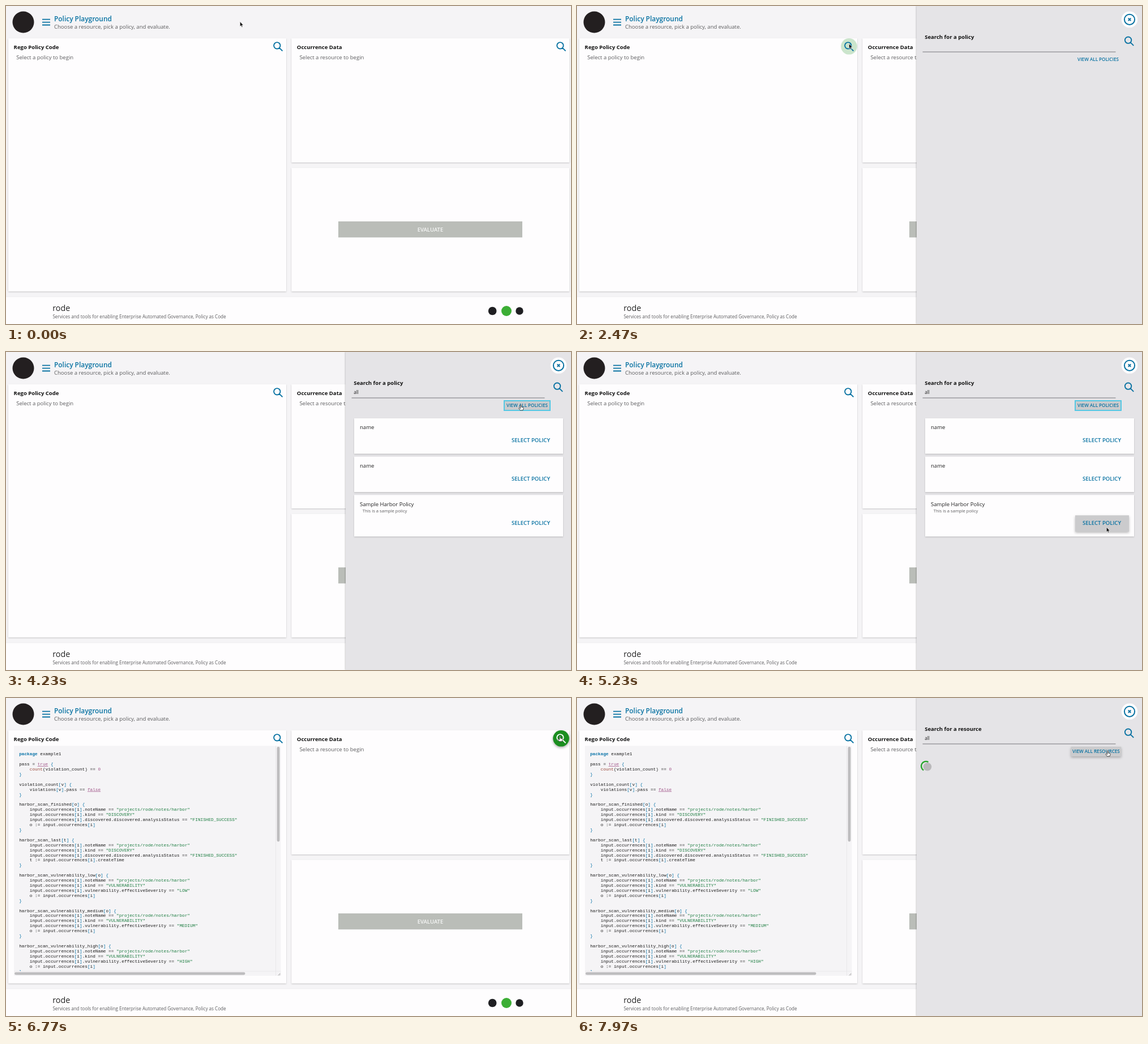
An HTML page that plays this animation: 998 by 561 pixels, repeating every 8000 ms.

```html
<!DOCTYPE html>
<html lang="en">
<head>
<meta charset="utf-8">
<title>Policy Playground</title>
<style>
  html, body { margin: 0; width: 100%; height: 100%; overflow: hidden; background: #f5f4f6; }
  svg { display: block; }
  text { font: 9.54px "Open Sans", sans-serif; fill: #222; white-space: pre; }
  .title { font-size: 11.92px; font-weight: 600; fill: #0872a2; }
  .bold { font-weight: 700; fill: #111; }
  .muted { fill: #5c5c5e; }
  .small { font-size: 8.1px; }
  .action { font-weight: 600; fill: #0872a2; }
  .card { fill: #fefdfe; filter: drop-shadow(0 1px 1px #0003); }
  .column { width: 491px; }
  .lift { fill: #cbcbcd; filter: drop-shadow(0 2px 2px #0004); }
  .thumb { fill: #bebdbf; }
  .blue { color: #0872a2; }

  .search circle { fill: none; }
  .search.hover { color: #fff; }
  .search.hover circle { fill: #1b8e20; filter: drop-shadow(0 2px 2px #0005); }
  .search.focus circle { fill: #cbe5cc; }

  .code text { font: 7.74px "Liberation Mono", monospace; fill: #1c1c1c; }
  .code .keyword, .code .punctuation { fill: #0873a8; }
  .code .keyword { font-weight: 700; }
  .code .boolean { fill: #a2588b; text-decoration: underline; }
  .code .number { fill: #a2588b; }
  .code .call { fill: #9c4a3c; }
  .code .string { fill: #1f7f43; }

  /* A page scrollbar narrows the layout for a moment. */
  .scrolled .column { width: 486.8px; }
  .scrolled .evaluate { width: 322.5px; }
  .scrolled .near { transform: translateX(-4.2px); }
  .scrolled .middle { transform: translateX(-5px); }
  .scrolled .center { transform: translateX(-6.7px); }
  .scrolled .far { transform: translateX(-8.4px); }
  .scrolled .wide { width: 400px; }
</style>
</head>
<body>
<svg id="stage" width="998" height="561" viewBox="0 0 998 561">
  <defs>
    <g id="lens" fill="none" stroke="currentColor" stroke-width="1.9">
      <path d="M5.7 0a5.7 5.7 0 1 1-11.4 0a5.7 5.7 0 1 1 11.4 0M4.1 4.1L9.6 9.6"/>
    </g>
    <path id="arrow" d="M0 0V8.6L2 6.9L3.3 9.9L4.7 9.3L3.4 6.4H6Z"
          fill="#111" stroke="#fff" stroke-width=".6"/>
    <path id="hand" d="M-.8 .6Q0-.6.8 .6V4L4 4.8Q4.8 5 4.6 6.3L3.6 9.8H-1.3L-3.6 6.4Q-3.6 5-2.2 5.6L-.8 6.8Z"
          fill="#fff" stroke="#222" stroke-width=".8"/>
  </defs>

  <rect width="998" height="561" fill="#f5f4f6"/>
  <circle cx="30.5" cy="28.5" r="19" fill="#231f20"/>
  <path d="M64 23.7h14M64 28.6h14M64 33.5h14" stroke="#0872a2" stroke-width="1.8"/>
  <text class="title" x="85" y="26.5">Policy Playground</text>
  <text class="muted" x="85" y="40.4">Choose a resource, pick a policy, and evaluate.</text>

  <rect class="card column" x="4" y="57" height="446.5"/>
  <text class="bold" x="13.6" y="76.4">Rego Policy Code</text>
  <text class="muted" id="policyHint" x="18.2" y="94.4">Select a policy to begin</text>
  <g class="near"><g class="search blue" id="policySearch">
    <circle cx="480.5" cy="71.3" r="14.3"/><use href="#lens" x="478.8" y="69.8"/>
  </g></g>

  <g class="code" id="code">
    <rect class="column" x="14" y="84.5" height="405.5" fill="#f5f4f6" style="width:auto" id="codeBox"/>
    <svg x="14" y="84.5" width="462" height="397.5" viewBox="14 84.5 462 397.5" id="lines"></svg>
    <path d="M14 482h462" stroke="#e4e3e5" stroke-width=".7"/>
    <g class="near">
      <path d="M476.5 84.5V490M476 482h9.5" stroke="#e4e3e5" stroke-width=".7"/>
      <rect class="thumb" x="478.6" y="86" width="4.8" height="167.5" rx="2.4"/>
      <path d="M480.5 489.5l4-4M482.7 489.5l2-2" stroke="#888" stroke-width=".7"/>
    </g>
    <rect class="thumb wide" x="15" y="483.7" width="407.5" height="4.8" rx="2.4"/>
  </g>

  <g class="near">
    <rect class="card column" x="504.2" y="57" height="219"/>
    <rect class="card column" x="504.2" y="285.5" height="218"/>
    <text class="bold" x="513.8" y="76.4">Occurrence Data</text>
    <text class="muted" x="518.4" y="94.4">Select a resource to begin</text>
  </g>
  <g class="far"><g class="search blue" id="resourceSearch">
    <circle cx="980.5" cy="71.3" r="14.3"/><use href="#lens" x="978.9" y="69.8"/>
  </g></g>
  <rect class="evaluate middle" x="587" y="380" width="325" height="28.3" fill="#babdb8"/>
  <text class="center" x="749.5" y="397.6" text-anchor="middle" style="fill:#f7f8f7;font-weight:600">EVALUATE</text>

  <rect y="513" width="998" height="48" fill="#fefdfe"/>
  <path d="M0 513h998" stroke="#ecebed" stroke-width=".8"/>
  <text x="82.3" y="538" style="font-size:14.3px">rode</text>
  <text class="small muted" x="82.4" y="551">Services and tools for enabling Enterprise Automated Governance, Policy as Code</text>
  <g class="far" fill="#1f1f22">
    <circle cx="859.2" cy="538" r="7.3"/>
    <circle cx="884" cy="538" r="9" fill="#3cae35"/>
    <circle cx="907" cy="538" r="6.7"/>
  </g>
  <g id="pageBar">
    <rect x="990.5" width="7.5" height="561" fill="#f9f8fa"/>
    <path d="M990.8 0V561" stroke="#e4e3e5" stroke-width=".7"/>
    <rect class="thumb" x="992.8" y="2" width="4.8" height="507" rx="2.4"/>
  </g>

  <g id="panel">
    <rect x="600" width="398" height="561" fill="#e5e4e7" style="filter:drop-shadow(-1px 0 1px #0003)"/>
    <circle cx="976" cy="23.8" r="14.3" fill="#fefdfe"/>
    <circle cx="976" cy="23.8" r="9.1" fill="none" stroke="#0872a2" stroke-width="2"/>
    <path d="M973.7 21.5l4.6 4.6M978.3 21.5l-4.6 4.6" stroke="#0872a2" stroke-width="2"/>
    <text class="bold" id="panelTitle" x="614.2" y="57.8"></text>
    <text class="small" id="query" x="614.2" y="73.6">all</text>
    <path d="M610.5 81h341" stroke="#77767a" stroke-width="1"/>
    <use class="blue" href="#lens" x="973.6" y="60.2"/>
    <rect id="viewAllBox" y="86" height="17"/>
    <text class="small action" id="viewAll" y="97.4" text-anchor="middle"></text>
    <g id="spinner">
      <circle cx="619" cy="121.3" r="7.3" fill="#bab9bb"/>
      <path id="spinnerArc" d="M612.2 127.4A8.1 8.1 0 0 1 620.5 113" fill="none" stroke="#25a52a" stroke-width="2.4"/>
    </g>
    <rect id="placeholder" x="948.7" y="532" width="21.5" height="18" fill="#d3d2d5"/>
    <g id="results"></g>
  </g>
  <use id="cursor" href="#arrow"/>
</svg>

<script>
const LOOP = 8000;
const $ = id => document.getElementById(id);
const show = (id, visible) => { $(id).style.display = visible ? "" : "none"; };

const scanRule = (name, arg, kind, fieldTest, result) => `${name}[${arg}] {
    input.occurrences[i].noteName == "projects/rode/notes/harbor"
    input.occurrences[i].kind == "${kind}"
    input.occurrences[i].${fieldTest}
    ${result}
}
`;
const finished = 'discovered.discovered.analysisStatus == "FINISHED_SUCCESS"';
const severityRule = level => scanRule(`harbor_scan_vulnerability_${level}`, "o", "VULNERABILITY",
  `vulnerability.effectiveSeverity == "${level.toUpperCase()}"`, "o := input.occurrences[i]");
const source = [
  "package example1\n",
  "pass = true {\n    count(violation_count) == 0\n}\n",
  "violation_count[v] {\n    violations[v].pass == false\n}\n",
  scanRule("harbor_scan_finished", "o", "DISCOVERY", finished, "o := input.occurrences[i]"),
  scanRule("harbor_scan_last", "t", "DISCOVERY", finished, "t := input.occurrences[i].createTime"),
  ...["low", "medium", "high"].map(severityRule)
].join("\n");

const tokens = /(?<string>"[^"]*")|(?<keyword>\bpackage\b)|(?<boolean>\b(?:true|false)\b)|(?<call>\bcount(?=\())|(?<number>\b0\b)|(?<punctuation>[[\]{}])/g;
const highlight = line => line.replace(tokens, (token, ...rest) => {
  const [kind] = Object.entries(rest.at(-1)).find(([, match]) => match);
  return `<tspan class="${kind}">${token}</tspan>`;
});
$("lines").innerHTML = source.split("\n")
  .map((line, i) => `<text x="23.2" y="${101.2 + i * 8.915}">${highlight(line)}</text>`).join("");

const resultCard = (y, height, name, note = "") => `
  <rect class="card" x="615" y="${y}" width="369" height="${height}"/>
  <text x="625" y="${y + 19.3}">${name}</text>
  <text class="muted" x="629.8" y="${y + 31}" style="font-size:7.63px">${note}</text>
  ${note && `<rect class="lift" id="selectHover" x="880" y="${y + 36}" width="95" height="28.7"/>`}
  <text class="action" x="927" y="${y + height - 20.2}" text-anchor="middle">SELECT POLICY</text>`;
$("results").innerHTML = resultCard(117, 62.5, "name") + resultCard(184.6, 62.5, "name") +
  resultCard(252.2, 73.3, "Sample Harbor Policy", "This is a sample policy");

// Cursor stops: arrival time, departure time, x, y
const stops = [
  [0, 970, 413.3, 27.5],
  [2080, 2500, 480.5, 66.5],
  [3250, 4250, 909.5, 93],
  [5040, 5420, 935.3, 309],
  [6680, 7120, 978.5, 67],
  [7880, LOOP, 937.5, 93]
];
function cursorAt(t) {
  const next = stops.findIndex(([arrive]) => arrive > t);
  if (next < 0) return stops.at(-1).slice(2);
  const [, depart, x0, y0] = stops[next - 1];
  const [arrive, , x1, y1] = stops[next];
  const p = Math.max(0, (t - depart) / (arrive - depart));
  const ease = p * p * (3 - 2 * p);
  return [x0 + (x1 - x0) * ease, y0 + (y1 - y0) * ease];
}

const CODE_LOADED = 5285;

function setPanel(kind, x, width, hovered, focused) {
  $("panelTitle").textContent = `Search for a ${kind}`;
  $("viewAll").textContent = kind === "policy" ? "VIEW ALL POLICIES" : "VIEW ALL RESOURCES";
  $("viewAll").setAttribute("x", x + width / 2);
  const box = $("viewAllBox");
  box.setAttribute("x", x);
  box.setAttribute("width", width);
  box.setAttribute("class", hovered && !focused ? "lift" : "");
  box.setAttribute("fill", focused ? "#cbcbcd" : "none");
  box.setAttribute("stroke", focused ? "#55c8e4" : "none");
  box.setAttribute("stroke-width", 2);
}

function render(t) {
  const within = (from, to) => t >= from && t < to;
  const [x, y] = cursorAt(t);
  const over = (left, top, right, bottom) => x > left && x < right && y > top && y < bottom;

  const policyPanel = within(2300, CODE_LOADED);
  const resourcePanel = t >= 7050;
  const panel = policyPanel || resourcePanel;
  const loading = within(3470, 3820) || t >= 7940;
  const scrolled = within(CODE_LOADED, 5480);

  const policyHover = !panel && Math.hypot(x - 480.5, y - 71.3) < 14.3;
  const resourceHover = !panel && Math.hypot(x - 980.5, y - 71.3) < 14.3;
  const viewHover = panel && over(policyPanel ? 880 : 872, 86, 961, 103);

  $("stage").classList.toggle("scrolled", scrolled);
  show("pageBar", scrolled);
  show("code", t >= CODE_LOADED);
  show("policyHint", t < CODE_LOADED);
  $("codeBox").style.width = (scrolled ? 467.3 : 471.5) + "px";
  $("policySearch").classList.toggle("hover", policyHover);
  $("policySearch").classList.toggle("focus", within(2300, 3600));
  $("resourceSearch").classList.toggle("hover", resourceHover);

  show("panel", panel);
  if (policyPanel) setPanel("policy", 880, 81, viewHover, t >= 3600);
  else setPanel("resource", 872.5, 88.7, viewHover, false);
  show("query", within(3470, CODE_LOADED) || t >= 7940);
  show("spinner", loading);
  const spin = (t - (t < 5000 ? 3530 : 7970)) * 0.36;
  $("spinnerArc").setAttribute("transform", `rotate(${spin} 618.5 121)`);
  show("placeholder", within(3470, 3600));
  show("results", within(3820, CODE_LOADED));
  show("selectHover", over(880, 288, 975, 317));

  const pointing = policyHover || resourceHover || viewHover;
  $("cursor").setAttribute("href", pointing ? "#hand" : "#arrow");
  $("cursor").setAttribute("transform", `translate(${x} ${y})`);
}

function tick() {
  render(performance.now() % LOOP);
  requestAnimationFrame(tick);
}
tick();
</script>
</body>
</html>
```
